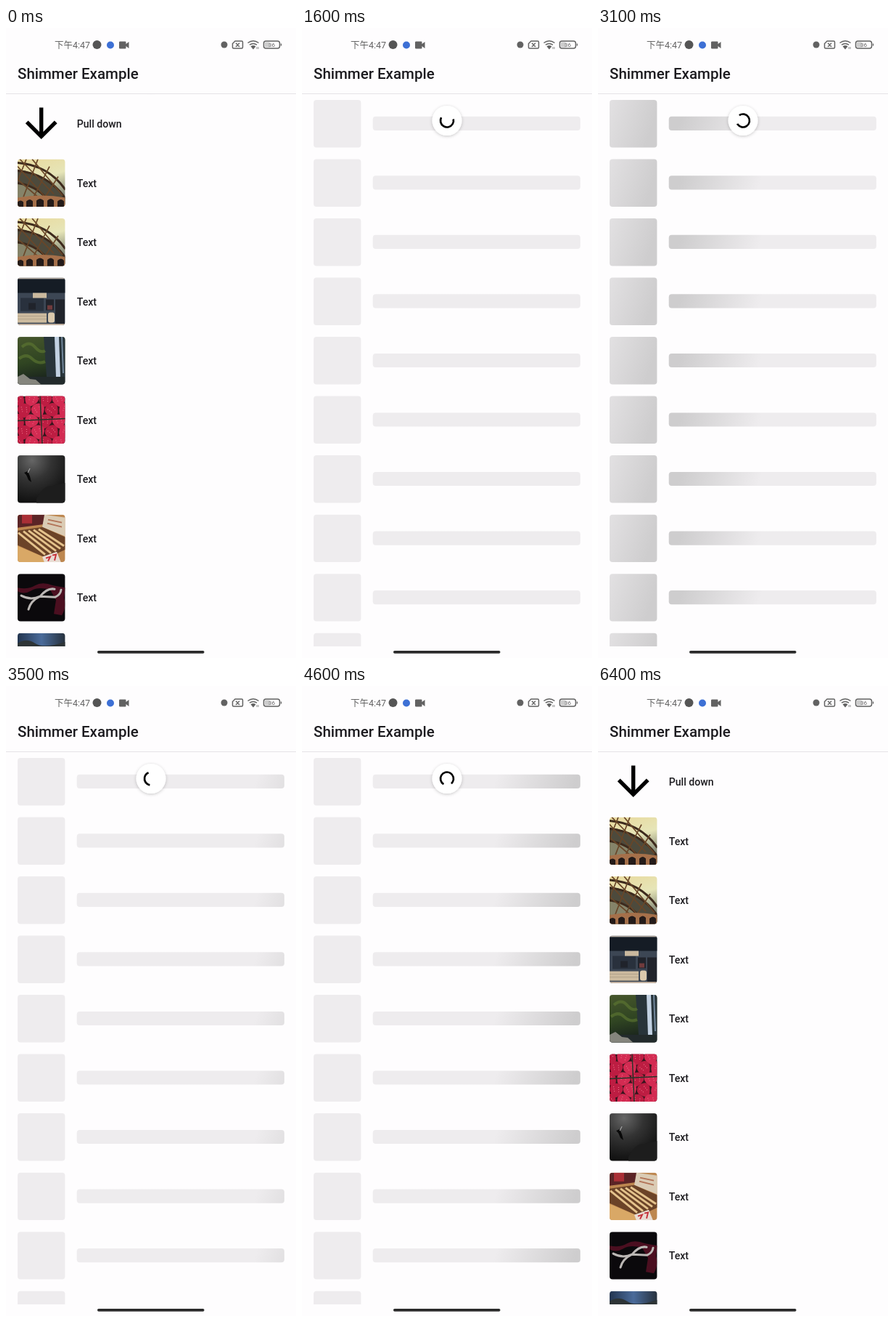
An HTML page that plays this animation: 400x867 px, repeating every 6500 ms.

```html
<!DOCTYPE html>
<html lang="en">
<head>
<meta charset="utf-8">
<title>Shimmer Example</title>
<style>
  html, body { margin: 0; width: 100%; height: 100%; overflow: hidden; background: #fefdfe; }
  svg { display: block; }
  text { font-family: Roboto, "Noto Sans CJK SC", "Noto Sans CJK", sans-serif; fill: #1c1b1f; font-weight: 500; }
  .status { fill: #626262; font-weight: 400; }
  .line { fill: none; stroke: #626262; stroke-width: 1.5; }
</style>
</head>
<body>
<svg width="400" height="867" viewBox="0 0 400 867">
  <defs>
    <clipPath id="listClip"><rect y="91" width="400" height="760"/></clipPath>
    <clipPath id="thumbClip"><rect width="65.4" height="65.4" rx="4"/></clipPath>
    <filter id="shadow" x="-30%" y="-30%" width="160%" height="160%">
      <feDropShadow dx="0" dy="1" stdDeviation="2" flood-opacity=".22"/>
    </filter>
    <linearGradient id="shimmer" gradientUnits="userSpaceOnUse" x1="0" x2="260">
      <stop offset="0" stop-color="#eeecee"/>
      <stop offset=".43" stop-color="#cecdce"/>
      <stop offset=".57" stop-color="#cecdce"/>
      <stop offset="1" stop-color="#eeecee"/>
    </linearGradient>
    <linearGradient id="sky" x2=".3" y2="1">
      <stop offset="0" stop-color="#e9d99c"/><stop offset=".5" stop-color="#e6e5b8"/><stop offset="1" stop-color="#71776a"/>
    </linearGradient>
    <linearGradient id="leaves" x2=".2" y2="1">
      <stop offset="0" stop-color="#46562c"/><stop offset=".55" stop-color="#304522"/><stop offset="1" stop-color="#17201c"/>
    </linearGradient>
    <radialGradient id="depth" cx=".3" cy=".1" r=".9">
      <stop offset="0" stop-color="#666"/><stop offset=".45" stop-color="#333"/><stop offset="1" stop-color="#101010"/>
    </radialGradient>
    <linearGradient id="dusk">
      <stop offset="0" stop-color="#22344f"/><stop offset=".5" stop-color="#4a6b9a"/><stop offset="1" stop-color="#26303c"/>
    </linearGradient>

    <g id="bridge">
      <rect width="66" height="66" fill="url(#sky)"/>
      <path d="M0 14Q42 20 66 54V66H0Z" fill="#4d4a3c"/>
      <path d="M0 34Q22 36 38 54H0Z" fill="#858369"/>
      <path d="M0 5Q42 8 66 42M0 16Q42 20 66 54M0 33Q24 36 40 54" fill="none" stroke="#3d2a1d" stroke-width="3"/>
      <path d="M3 0L50 48M20 0L62 50M0 10L38 52M0 28L28 52M28 0L8 52M44 10L22 52M56 24L38 52M12 0L0 30" stroke="#694628" stroke-width="1.7"/>
      <path d="M0 53Q33 47 66 53V66H0Z" fill="#a5704a"/>
      <path d="M0 66V59q4-4 8 0V66M12 66V58q5-5 9 0V66M26 66V57q5-5 10 0V66M41 66V57q5-5 9 0V66M55 66V58q5-5 9 0V66" fill="#241b19"/>
    </g>
    <g id="desk">
      <rect width="66" height="66" fill="#3c4654"/>
      <rect width="66" height="2" fill="#b9aea4"/>
      <rect y="2" width="66" height="19" fill="#151c25"/>
      <path d="M4 28h32v18H4Z" fill="#29313d"/>
      <path d="M15 35h10v9H15ZM39 30h11v15H39ZM52 30h13v34H52Z" fill="#20232b"/>
      <rect x="21" y="21" width="19" height="7" fill="#cab99e"/>
      <rect x="41" y="38" width="7" height="6" fill="#703b3c"/>
      <rect y="49" width="40" height="13" fill="#cdbb9f"/>
      <path d="M0 53H40M0 57H40" stroke="#aa9b86" stroke-width=".7"/>
      <rect x="42" y="48" width="9" height="14" rx="3" fill="#dac8ac"/>
      <rect y="63.5" width="66" height="2" fill="#c6b4a3"/>
    </g>
    <g id="waterfall">
      <rect width="66" height="66" fill="url(#leaves)"/>
      <path d="M36 0H66V55H40Z" fill="#28343a"/>
      <path d="M6 14q10-9 18 0t14 5M2 30q10-8 18 0t18 4" stroke="#5f7b33" stroke-width="4" fill="none" opacity=".6"/>
      <path d="M51 0h6L59 56H53Z" fill="#c2d1e2"/><path d="M61 0L63 50" stroke="#71869a" stroke-width="2"/>
      <path d="M0 55H66V66H0Z" fill="#222a2b"/>
      <path d="M0 66V55l8-4 9 7 8 1 8 7Z" fill="#85857d"/>
    </g>
    <g id="berries"></g>
    <g id="diver">
      <rect width="66" height="66" fill="url(#depth)"/>
      <path d="M26 60q10-20 22-18l18-4V66H26Z" fill="#1d1d1d"/>
      <path d="M9 24l5-2 3 7 2 8-4-3-3-7Z" fill="#080808"/>
      <path d="M17 18L14 24" stroke="#bbb"/>
    </g>
    <g id="tools">
      <rect width="66" height="66" fill="#bd8750"/>
      <path d="M0 0H38V13L0 18Z" fill="#5b2426"/><path d="M6 0h14v12H6Z" fill="#a92f36"/>
      <path d="M37 0L66 4V30L34 17Z" fill="#dacbb4"/><path d="M42 7l19 4M41 12l20 5" stroke="#b27357" stroke-width="2"/>
      <path d="M0 22L34 17L66 31V48L40 60L0 42Z" fill="#6b4328"/>
      <path d="M1 25L38 55M8 23L46 53M15 22L53 50M22 21L59 47M29 20L64 43" stroke="#e4c28c" stroke-width="3"/>
      <path d="M0 43L40 60V66H0Z" fill="#d9a866"/>
      <path d="M34 58L54 51L60 66H37Z" fill="#e8ddd4"/><path d="M39 60l6-2-3 6M48 56l5-1-2 8" stroke="#c6323a" stroke-width="2" fill="none"/>
    </g>
    <g id="branch">
      <rect width="66" height="66" fill="#0b090c"/>
      <path d="M0 19q14 3 24-3t25 0l17 3-2 14q4 12-3 24l-11-2 3-19-8-14q-16-5-26 1T0 24Z" fill="#4b0f20"/>
      <path d="M5 30q13 7 26 1l21 1q7-3 8-10M31 31q10-12 20-10M31 31q-13 6-16 18" fill="none" stroke="#bbb7b4" stroke-width="3" stroke-linecap="round"/>
    </g>
    <g id="evening">
      <rect width="66" height="66" fill="url(#dusk)"/>
      <path d="M0 14q12-8 24 0t42-2V66H0Z" fill="#2d3436"/>
    </g>
  </defs>

  <rect width="400" height="867" fill="#fefdfe"/>
  <g id="statusBar">
    <text class="status" x="67" y="27.5" font-size="12.5">下午4:47</text>
    <circle cx="125.5" cy="23" r="6" fill="#555"/>
    <circle cx="144" cy="23.5" r="5" fill="#3d70d5"/>
    <path d="M157.500 18.500h7q1 0 1 1v2.500l4-3v9l-4-3v2.500q0 1-1 1h-7q-1.500 0-1.500-1v-8q0-1 1.500-1Z" fill="#626262"/>
    <circle cx="301" cy="23" r="4.500" fill="#626262"/>
    <path class="line" d="M316 18h9q1.500 0 1.500 1.500v7q0 1.500-1.500 1.500h-11q-1.500 0-1.500-1.500V21.500ZM317 20.700l5 5M322 20.700l-5 5"/>
    <path class="line" d="M333.500 20.500q7.500-5.500 15 0M336 23.200q5-3.500 10 0" stroke-width="1.800"/>
    <path d="M337.500 25.300q3.500-2.500 7 0L341 29.500Z" fill="#626262"/>
    <path d="M346 26v3M348 26v3" stroke="#777" stroke-width=".8"/>
    <rect class="line" x="355.500" y="18" width="22" height="10" rx="3" stroke-width="1.200"/>
    <path d="M379.500 21.500v3" stroke="#626262" stroke-width="1.300"/>
    <rect x="357" y="19.500" width="7" height="7" rx="1" fill="#ccc"/>
    <text class="status" x="366.500" y="26" font-size="8" text-anchor="middle">36</text>
  </g>
  <text x="16" y="70" font-size="20.500">Shimmer Example</text>
  <rect y="90" width="400" height="1" fill="#e5e3e6"/>

  <g clip-path="url(#listClip)">
    <g id="content">
      <path d="M48.700 109.500V149M28.700 129.300l20 20 20-20" fill="none" stroke="#000" stroke-width="5.400"/>
    </g>
    <g id="skeleton" fill="url(#shimmer)"></g>
    <g id="spinner">
      <circle r="20.500" fill="#fff" filter="url(#shadow)"/>
      <g id="ring">
        <circle id="arc" r="9" pathLength="360" fill="none" stroke="#000" stroke-width="2.700"/>
        <path id="arrow" d="M4 0H14L9 5Z"/>
      </g>
    </g>
  </g>
  <rect x="126" y="857" width="147.500" height="3.700" rx="1.850" fill="#2b2b2b"/>
</svg>

<script>
const LOOP = 6500, STEP = 100;
const RELEASE = 400, SETTLED = 600, SPIN = 1270;
const LOAD_START = 1250, LOAD_END = 5250;
const SPIN_PERIOD = 1332, SHIMMER_PERIOD = 1182, SHIMMER_SPEED = 0.95;
const ROW_TOP = 99, ROW_HEIGHT = 81.52;

const el = id => document.getElementById(id);
const clamp = v => Math.max(0, Math.min(1, v));
const mix = (a, b, k) => a + (b - a) * k;
const mod = (a, n) => ((a % n) + n) % n;

function buildBerries() {
  let out = '<rect width="66" height="66" fill="#35151d"/>';
  for (let row = 0; row < 5; row++) {
    for (let col = 0; col < 4; col++) {
      const x = col * 19 + (row % 2) * 9, y = row * 15 + 4, turn = (row * 47 + col * 71) % 90 - 45;
      out += `<g transform="translate(${x} ${y}) rotate(${turn})">
        <path d="M0-9Q11-8 9 1Q5 10 0 11Q-6 9-9 1Q-10-8 0-9Z" fill="${col % 2 ? '#d32b52' : '#bd1d42'}"/>
        <path d="M-4-4l2 7M3-4l1 8" stroke="#ed7187" stroke-width="1.200" stroke-dasharray="1 2"/></g>`;
    }
  }
  el('berries').innerHTML = out + '<path d="M31 0L34 66M0 34L66 31" stroke="#293328" stroke-width="1.500"/>';
}

function buildRows() {
  const thumbs = ['', 'bridge', 'bridge', 'desk', 'waterfall', 'berries', 'diver', 'tools', 'branch', 'evening'];
  let content = '', skeleton = '';
  thumbs.forEach((name, i) => {
    const move = `transform="translate(0 ${ROW_TOP + i * ROW_HEIGHT})"`;
    const image = name && `<g transform="translate(16)" clip-path="url(#thumbClip)"><use href="#${name}"/></g>`;
    content += `<g ${move}>${image}<text x="97.700" y="38" font-size="14.100">${i ? 'Text' : 'Pull down'}</text></g>`;
    skeleton += `<g ${move}><rect x="16" width="65.400" height="65.400" rx="4"/>
      <rect x="97.700" y="22.800" width="286.200" height="19.200" rx="4"/></g>`;
  });
  el('content').innerHTML += content;
  el('skeleton').innerHTML = skeleton;
}

// cubic-bezier(.4, 0, .2, 1)
function fastOutSlowIn(x) {
  let lo = 0, hi = 1;
  for (let i = 0; i < 20; i++) {
    const s = (lo + hi) / 2, r = 1 - s;
    if (1.2 * r * r * s + 0.6 * r * s * s + s ** 3 < x) lo = s; else hi = s;
  }
  return 3 * lo * lo - 2 * lo ** 3;
}

// Start and sweep of the arc, in degrees.
function arcAt(t, pull) {
  if (t < SETTLED) return [180 * (-0.25 + 0.4 * pull), 288 * pull];
  if (t < SPIN) {
    const k = (t - SETTLED) / (SPIN - SETTLED);
    return [360 * (0.79 * k + mix(0.075, 1, k)) + 216 * k, 360 * (0.8 - 0.79 * k)];
  }
  const turns = (t - SPIN) / SPIN_PERIOD, cycle = Math.floor(turns), f = turns - cycle;
  const growing = f < 0.5;
  const eased = fastOutSlowIn(growing ? f * 2 : f * 2 - 1);
  const sweep = 0.79 * (growing ? eased : 1 - eased) + 0.01;
  const trim = 0.78 * cycle + (growing ? 0 : 0.79 - sweep);
  return [274 + 360 * (trim + 0.21 * turns) + 216 * turns, 360 * sweep];
}

function drawSpinner(t) {
  const pull = clamp((t - 50) / (RELEASE - 50));
  const settle = clamp((t - RELEASE) / (SETTLED - RELEASE));
  const y = t < RELEASE ? mix(66, 150, pull) : mix(150, 127.5, 1 - (1 - settle) ** 2);
  const scale = 1 - clamp((t - LOAD_END) / 150);
  const [start, sweep] = arcAt(t, pull);
  el('spinner').setAttribute('transform', `translate(200 ${y}) scale(${scale})`);
  el('ring').setAttribute('transform', `rotate(${start})`);
  el('ring').setAttribute('opacity', mix(0.3, 1, pull));
  el('arc').setAttribute('stroke-dasharray', `${sweep} 360`);
  el('arrow').setAttribute('transform', `rotate(${sweep})`);
  el('arrow').style.display = t < SPIN ? '' : 'none';
}

function frame(now) {
  const t = Math.floor((now % LOOP) / STEP) * STEP;
  const loading = t >= LOAD_START && t < LOAD_END;
  el('content').style.display = loading ? 'none' : '';
  el('skeleton').style.display = loading ? '' : 'none';
  const x = SHIMMER_SPEED * mod(t - LOAD_START, SHIMMER_PERIOD) - 670;
  el('shimmer').setAttribute('gradientTransform', `translate(${x + 10}) skewX(-18)`);
  drawSpinner(t);
  requestAnimationFrame(frame);
}

buildBerries();
buildRows();
requestAnimationFrame(frame);
</script>
</body>
</html>
```
